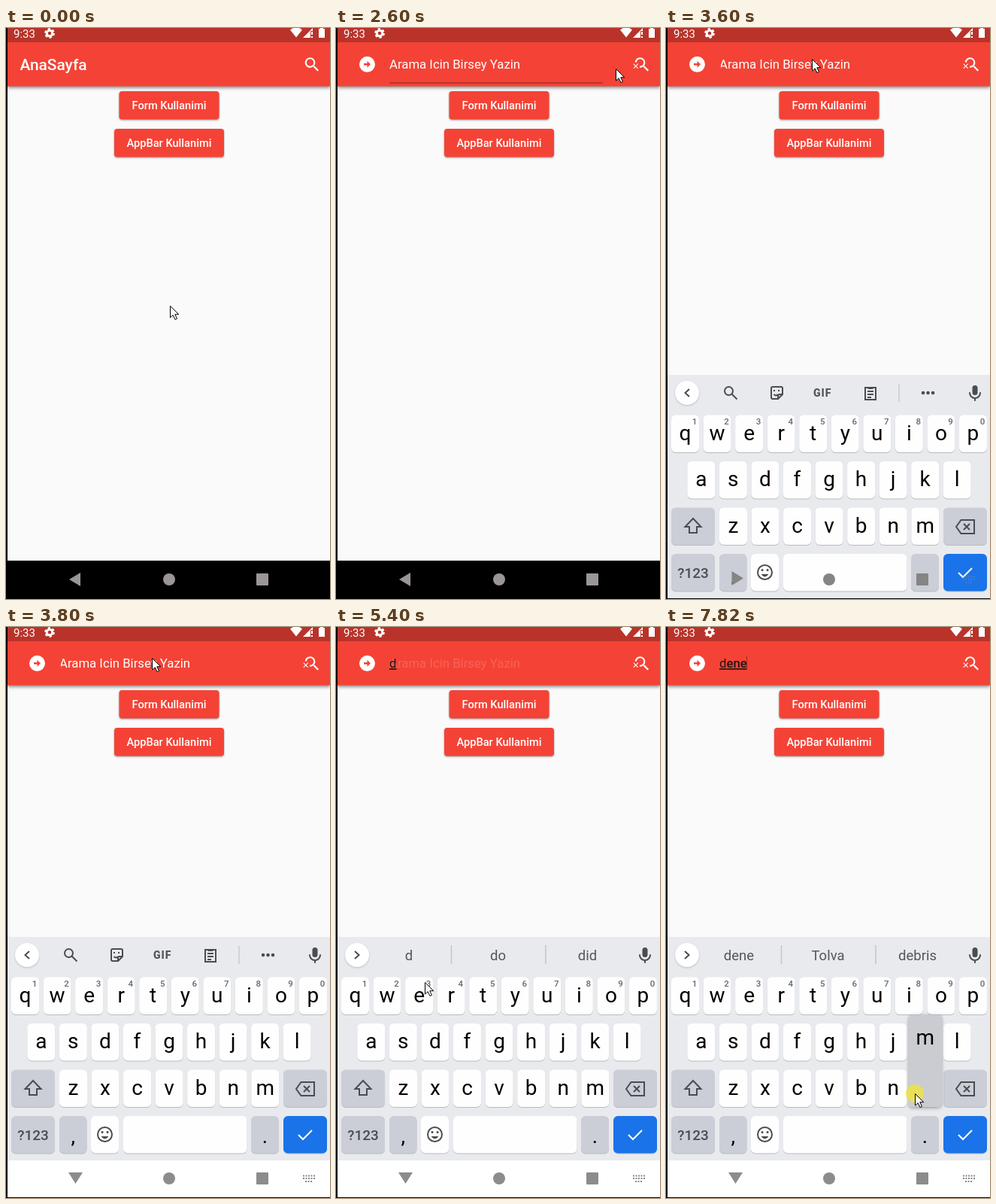
These frames come from a looping animation (431 px wide and 759 px high, 8 s). An HTML page:

```html
<!DOCTYPE html>
<html lang="tr">
<head>
<meta charset="utf-8">
<title>Arama</title>
<style>
  html, body { margin: 0; width: 100%; height: 100%; overflow: hidden; background: #000; }
  svg { display: block; width: 431px; height: 759px; font-family: Roboto, "Noto Sans", sans-serif; }
  .line { fill: none; stroke: #4a4c50; stroke-width: 2; }
  .mid { text-anchor: middle; }
  .btn { fill: #f44336; filter: drop-shadow(0 1.5px 1.2px #0006); }
  .key { filter: drop-shadow(0 1px 0 #b9bbc0); }
  .cap { font-size: 28px; }
  .word { font-size: 18.5px; fill: #53565a; }
</style>
</head>
<body>
<svg viewBox="0 0 431 759">
  <rect x="2" width="429" height="708" fill="#fafafa"/>
  <rect x="2" y="10" width="429" height="67.5" fill="#f44336" style="filter:drop-shadow(0 2px 2px #0007)"/>
  <rect x="2" width="429" height="19" fill="#b9332a"/>
  <g fill="#fff">
    <text x="10" y="12.5" font-size="15">9:33</text>
    <g fill="none" stroke="#fff">
      <circle cx="58" cy="7" r="3.8" stroke-width="3"/>
      <circle cx="58" cy="7" r="5.7" stroke-width="2.4" stroke-dasharray="3.1 2.87"/>
    </g>
    <path d="M378 2.5Q386 -4 394 2.5L386 12.5ZM395 13L408 0V4H405V13ZM406 11h2v2h-2zM406 5h2v4h-2zM416 1h2v-2h4v2h2v12h-8z"/>
  </g>

  <g id="home" fill="#fff">
    <text x="18.5" y="55.5" font-size="20.9" font-weight="500">AnaSayfa</text>
    <path transform="translate(394.6 36) scale(1.047)" d="M15.5 14h-.79l-.28-.27C15.41 12.59 16 11.11 16 9.5 16 5.91 13.09 3 9.5 3S3 5.91 3 9.5 5.91 16 9.5 16c1.61 0 3.09-.59 4.23-1.57l.27.28v.79l5 4.99L20.49 19zm-6 0C7.01 14 5 11.99 5 9.5S7.01 5 9.5 5 14 7.01 14 9.5 11.99 14 9.5 14z"/>
  </g>
  <g id="search" font-size="16.75">
    <circle cx="41.5" cy="48.3" r="10.5" fill="#fff"/>
    <path d="M37 47h4.5v-3.2L46 48.3l-4.5 4.5v-3.2H37z" fill="#f44336"/>
    <path fill="#fff" transform="translate(394.6 36) scale(1.047)" d="M15.5 14h-.79l-.28-.27C15.41 12.59 16 11.11 16 9.5 16 5.91 13.09 3 9.5 3 6.08 3 3.28 5.64 3.03 9h2.02C5.3 6.75 7.18 5 9.5 5 11.99 5 14 7.01 14 9.5S11.99 14 9.5 14c-.17 0-.33-.03-.5-.05v2.02c.17.02.33.03.5.03 1.61 0 3.09-.59 4.23-1.57l.27.28v.79l5 4.99L20.49 19zM6.47 10.82L4 13.29l-2.47-2.47-.71.71L3.29 14 .82 16.47l.71.71L4 14.71l2.47 2.47.71-.71L4.71 14l2.47-2.47z"/>
    <text id="hint" x="71" y="54" fill="#fff">Arama Icin Birsey Yazin</text>
    <rect id="rule" x="71" y="72.5" width="284" height="1" fill="#000" opacity=".45"/>
    <rect id="caret" x="71" y="39" width="2" height="19" fill="#f44336"/>
    <text x="71" y="54" fill="#201412" text-decoration="underline"><tspan id="first"></tspan><tspan id="rest" font-weight="500"></tspan></text>
    <rect id="endCaret" x="107" y="39" width="1" height="18" fill="#8f2b23"/>
  </g>

  <rect class="btn" x="150.5" y="84" width="133" height="37.5" rx="4"/>
  <rect class="btn" x="144" y="134" width="146" height="37.5" rx="4"/>
  <g class="mid" fill="#fff" font-size="14.66" font-weight="500">
    <text x="217" y="108">Form Kullanimi</text>
    <text x="217" y="158">AppBar Kullanimi</text>
  </g>

  <rect id="navBg" x="2" y="708.5" width="429" height="49.5" fill="#fff"/>
  <g id="board">
    <rect x="2" y="412" width="429" height="297" fill="#e8eaee"/>
    <circle cx="28" cy="436" r="16" fill="#fff" style="filter:drop-shadow(0 1px 1px #0003)"/>
    <path id="chevron" class="line"/>
    <g class="line" stroke-linecap="round">
      <rect x="407.5" y="426" width="7" height="13" rx="3.5" fill="#4a4c50" stroke="none"/>
      <path d="M404 436a7 7 0 0 0 14 0M411 443v3"/>
    </g>
    <g id="tools" class="line">
      <circle cx="83.500" cy="433.500" r="5.500"/><path d="M87.500 437.500l7 7"/>
      <path d="M142 428h11q2 0 2 2v8l-6 6h-7q-2 0-2-2v-12q0-2 2-2zM155 438h-4q-2 0-2 2v4M143.500 438q3 3 5 0M144 432v2M150 432v2"/>
      <text x="196" y="441" font-size="14" font-weight="900" letter-spacing="1" fill="#55575b" stroke="none">GIF</text>
      <path d="M265 429h14v16h-14zM268.500 430h7M268 434h8M268 438h8M268 442h5"/>
      <path d="M310 424v24" stroke="#c9cbd0" stroke-width="1.500"/>
      <path d="M342 436h.1M348.500 436h.1M355 436h.1" stroke-width="4.500" stroke-linecap="round"/>
    </g>
    <g id="words" class="mid word">
      <path d="M153.500 423v25M279 423v25" stroke="#c3c5ca" stroke-width="1.500"/>
      <text x="97" y="443"></text><text x="215.500" y="443"></text><text x="334.500" y="443"></text>
    </g>
    <g id="keys"></g>
    <g class="line">
      <path d="M36 603L46.500 614H41v8H31v-8h-5.500z"/>
      <path d="M386 614l6.500-9H410v18h-17.500zM396 610l8 8M404 610l-8 8"/>
      <circle cx="131.500" cy="674.500" r="9.500"/>
      <path d="M127 677q4.500 6 9 0" fill="#4a4c50" stroke-width="1"/>
      <path d="M128 671.500h.1M135 671.500h.1" stroke-width="3" stroke-linecap="round"/>
      <path d="M389 675l6 6 12-12" stroke="#fff"/>
    </g>
    <g id="popup">
      <rect x="-22" width="44" height="123" rx="5" fill="#cbccd1" style="filter:drop-shadow(0 1px 2px #0005)"/>
      <text class="mid cap" y="39"></text>
    </g>
  </g>

  <g id="nav">
    <path id="back"/>
    <circle cx="217" cy="733" r="8"/>
    <rect x="333" y="725" width="16" height="16" rx="1"/>
    <path id="imeIcon" d="M395 729.500h16M395 733h16M398 737h10" stroke="#888" stroke-width="2" stroke-dasharray="2 1.500"/>
  </g>
  <rect width="2" height="759"/>
  <circle id="tap" r="12" fill="#efe43c" opacity=".8"/>
  <path id="pointer" d="M.500 .500V16L4.200 12.700 7 18.500 9.500 17.400 6.800 11.700H11.800Z" fill="#fff" stroke="#000"/>
</svg>
<script>
const $ = id => document.getElementById(id);
const LAST = 39, LOOP = 8000;

// Keyboard: position of each letter key, reused by the press popup
const PITCH = 42.55, keyAt = {};
let keys = '';
function addKey(x, y, w, fill, label = '', cls = 'cap', dy = 33) {
  keys += `<rect class="key" x="${x}" y="${y}" width="${w}" height="49.5" rx="6" fill="${fill}"/>` +
    `<text class="mid ${cls}" x="${x + w / 2}" y="${y + dy}">${label}</text>`;
}
[['qwertyuiop', 7, 465.5], ['asdfghjkl', 28.3, 527], ['zxcvbnm', 71, 588.5]].forEach(([row, left, y], r) =>
  [...row].forEach((c, i) => {
    const x = left + i * PITCH;
    addKey(x, y, 37, '#fefefe', c);
    keyAt[c] = [x + 18.5, y - 73];
    if (!r) keys += `<text class="mid" x="${x + 31}" y="478" font-size="11.5" font-weight="500" fill="#66686c">${(i + 1) % 10}</text>`;
  }));
const GREY = '#cbced6';
addKey(7, 588.5, 58, GREY);
addKey(369, 588.5, 58, GREY);
addKey(7, 650, 58, GREY, '<tspan font-size="19" font-weight="500" fill="#4a4c50">?123</tspan>', '', 32);
addKey(71, 650, 36.5, GREY, ',', 'cap', 36);
addKey(113, 650, 37, '#fefefe');
addKey(156, 650, 164.5, '#fefefe');
addKey(326, 650, 37, GREY, '.', 'cap', 36);
addKey(369, 650, 58, '#1a73e8');
$('keys').innerHTML = keys;

// Pointer waypoints: step, x, y
const PATH = [
  [0, 218, 369], [5, 402, 57], [8, 404, 59], [11, 396, 58], [12, 396, 58], [13, 372, 54],
  [16, 194, 41], [21, 194, 41], [24, 131, 561], [26, 131, 561], [27, 118, 472], [29, 118, 472],
  [31, 300, 637], [32, 300, 637], [33, 169, 545], [34, 112, 490], [36, 112, 490],
  [38, 331, 620], [LAST, 331, 620]
];
const TAPS = [7, 17, 26, 28, 32, 35, LAST];
const PRESSED = { 26: 'd', 28: 'e', 32: 'n', 35: 'e', 39: 'm' };
const TYPED = [
  [27, 'd', ['d', 'do', 'did']],
  [29, 'de', ['de', 'den', 'delivered']],
  [33, 'den', ['den', 'dene', 'Tol']],
  [36, 'dene', ['dene', 'Tolva', 'debris']]
];

const startOf = i => 200 * i + (i > 27 ? 20 : i > 3 && i < 8 ? -20 : 0);
const show = (id, on) => $(id).style.display = on ? '' : 'none';
const set = (id, attr, value) => $(id).setAttribute(attr, value);
const move = (id, x, y) => set(id, 'transform', `translate(${x} ${y})`);

function pointerAt(i) {
  const k = Math.max(1, PATH.findIndex(p => p[0] >= i));
  const [a, x0, y0] = PATH[k - 1], [b, x1, y1] = PATH[k];
  const u = (i - a) / (b - a), e = u * u * (3 - 2 * u);
  return [x0 + (x1 - x0) * e, y0 + (y1 - y0) * e];
}

function render(i) {
  const searching = i >= 8, focused = i >= 17, open = i >= 18, settled = i >= 19;
  const [, text, words] = TYPED.findLast(s => s[0] <= i) || [0, '', []];

  show('home', !searching);
  show('search', searching);
  show('rule', !focused);
  show('caret', focused && !text);
  show('endCaret', i === LAST);
  set('hint', 'opacity', !text ? 1 : text === 'd' && i < 28 ? 0.17 : 0);
  $('first').textContent = text.slice(0, 1);
  $('rest').textContent = text.slice(1);

  show('board', open);
  show('navBg', settled);
  move('board', 0, settled ? 0 : 49);
  show('tools', !text);
  show('words', text);
  set('chevron', 'd', text ? 'M25 431l5.500 5-5.500 5' : 'M31 431l-5.500 5 5.500 5');
  document.querySelectorAll('#words text').forEach((el, n) => {
    el.textContent = words[n] || '';
    const best = words[n] === 'dene' && n === 1;
    el.style.fontWeight = best ? 700 : 400;
    el.style.fill = best ? '#2b2d30' : '';
  });

  const key = PRESSED[i];
  show('popup', key);
  if (key) {
    move('popup', ...keyAt[key]);
    document.querySelector('#popup text').textContent = key;
  }

  set('nav', 'fill', settled ? '#8c8c8c' : open ? '#858585' : '#9b9696');
  set('back', 'd', settled ? 'M83 725h19l-9.500 15z' : open ? 'M87.500 722v19l15.500-9.500z' : 'M84 733l15-9v18z');
  show('imeIcon', open);
  set('imeIcon', 'opacity', settled ? 1 : 0.4);

  const [x, y] = pointerAt(i);
  move('pointer', x, y);
  move('tap', x, y);
  show('tap', TAPS.includes(i));
}

let shown = -1;
function tick() {
  const t = performance.now() % LOOP;
  let i = LAST;
  while (startOf(i) > t) i--;
  if (i !== shown) render(shown = i);
  requestAnimationFrame(tick);
}
tick();
</script>
</body>
</html>
```
